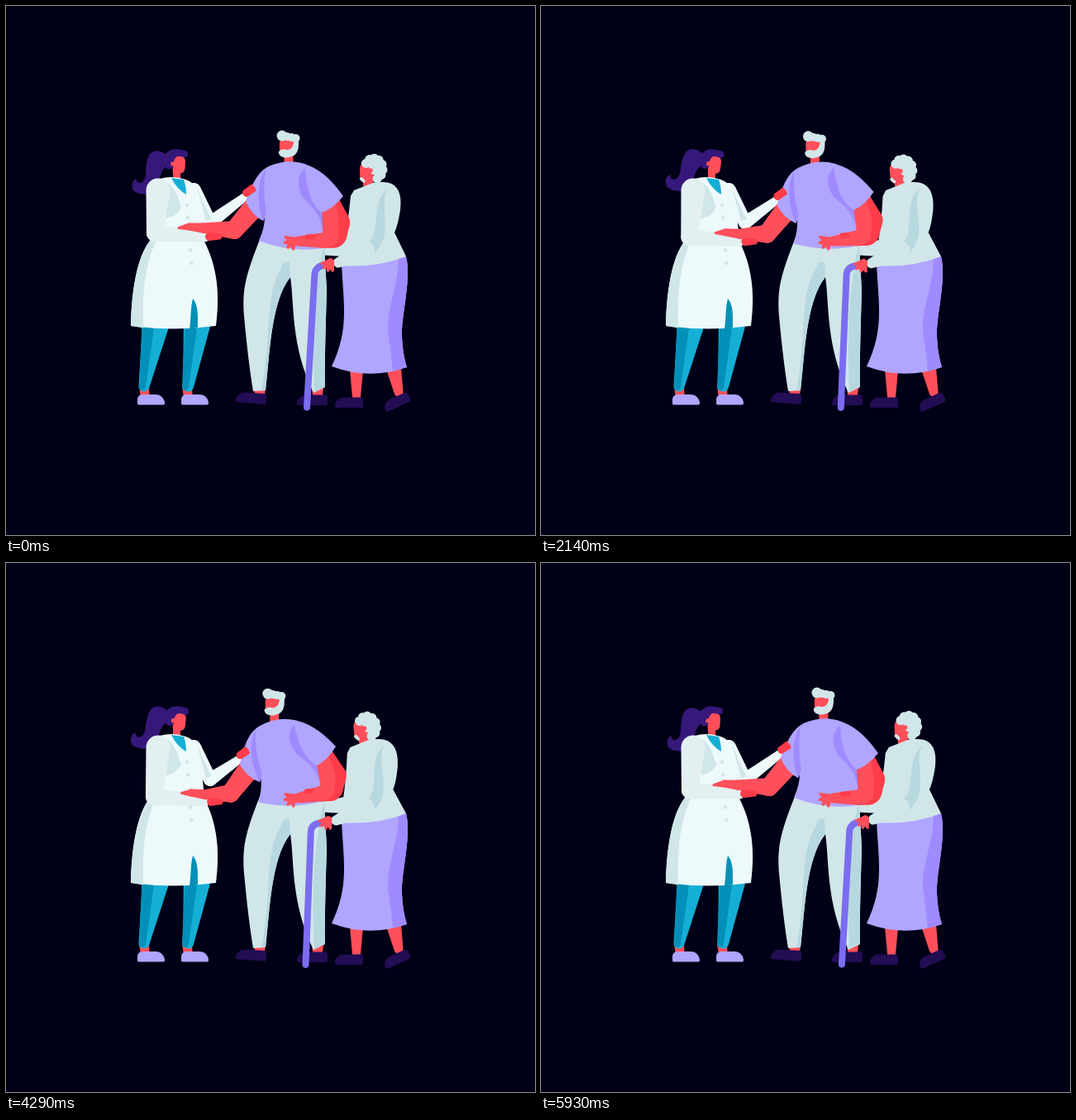
Recreate the animation shown at these times as an HTML page with a canvas. Size 640 by 640 pixels, loop 6 s.

```html
<!DOCTYPE html>
<html lang="en">
<head>
<meta charset="utf-8">
<title>Caregiver with an elderly couple</title>
<style>
html, body { margin: 0; width: 100%; height: 100%; overflow: hidden; background: #000016 }
canvas { display: block; width: 100vw; height: 100vh }
</style>
</head>
<body>
<canvas id="stage"></canvas>
<script>
const PERIOD = 3030, LOOP = 6000, SIZE = 640;
const SKIN = '#ff4f5a', FLUSH = '#ff3d4a', PALE = '#d1e6e9', PALE_SHADE = '#b8d8df';
const COAT = '#edf9fb', SLEEVE = '#e3f0f1', TEAL = '#15afd6', TEAL_SHADE = '#0290b8';
const LILAC = '#b0a5ff', VIOLET = '#9f8aff', HAIR = '#36187a', SHOE = '#230d54', CANE = '#7a6df0';

const canvas = document.getElementById('stage');
const ctx = canvas.getContext('2d');
const ratio = window.devicePixelRatio || 1;
canvas.width = canvas.height = SIZE * ratio;

function shape(color, path) {
  ctx.fillStyle = color;
  ctx.fill(new Path2D(path));
}

function dot(color, x, y, r) {
  ctx.fillStyle = color;
  ctx.beginPath();
  ctx.arc(x, y, r, 0, 7);
  ctx.fill();
}

// Tapered segments through joints [x, y, radius].
function limb(color, ...joints) {
  ctx.fillStyle = color;
  for (let i = 1; i < joints.length; i++) {
    const [x, y, r] = joints[i - 1], [u, v, s] = joints[i];
    const dir = Math.atan2(v - y, u - x);
    const side = Math.acos((r - s) / Math.hypot(u - x, v - y));
    ctx.beginPath();
    ctx.arc(x, y, r, dir + side, dir - side + 2 * Math.PI);
    ctx.arc(u, v, s, dir - side, dir + side);
    ctx.fill();
  }
}

// Four fingers fanned between two angles.
function hand(color, x, y, from, to, length) {
  for (let i = 0; i < 4; i++) {
    const a = from + (to - from) * i / 3;
    limb(color, [x, y, 4.5], [x + length * Math.cos(a), y + length * Math.sin(a), 1.7]);
  }
}

function shoe(color, x, y, width, corners) {
  ctx.fillStyle = color;
  ctx.beginPath();
  ctx.roundRect(x, y, width, 12.5, corners);
  ctx.fill();
}

function placed(setup, paint) {
  ctx.save();
  setup();
  paint();
  ctx.restore();
}

const shifted = (x, y, paint) => placed(() => ctx.translate(x, y), paint);
const turned = (deg, x, y, paint) => placed(() => {
  ctx.translate(x, y);
  ctx.rotate(deg * Math.PI / 180);
  ctx.translate(-x, -y);
}, paint);
// Leans everything above the base line, leaving the base in place.
const leaned = (slope, base, paint) => placed(() => ctx.transform(1, 0, slope, 1, -slope * base, 0), paint);
const swayer = k => (x, y, r, dx, dy) => [x + dx * k, y + dy * k, r];

function drawNurse(nod, sway) {
  for (const x of [0, 52]) {
    limb(SKIN, [167 + x, 460, 6], [168 + x, 470, 5.5]);
    limb(TEAL, [181 + x * .96, 386, 16], [167 + x * 1.03, 460, 6.5]);
    limb(TEAL_SHADE, [172 + x, 386, 7.5], [165 + x, 461, 4]);
    shoe(LILAC, 159 + x * 1.02, 470, 33, [7, 13, 2, 2]);
  }
  turned(8 * nod, 207, 203, () => {
    turned(4.5 * nod, 195, 185, () =>
      shape(HAIR, 'M195 181C187 173 174 172 171 186C167 200 172 207 165 213C161 216 157 213 158 209C153 210 151 217 154 223C160 229 178 230 183 221C188 211 184 201 195 193Z'));
    limb(SKIN, [209, 188, 8], [211, 197, 5.5]);
    limb(SKIN, [206, 197, 4.5], [207, 210, 4.5]);
    shape(HAIR, 'M191 190C189 178 200 171 211 174Q221 174 220 180C218 186 212 181 207 182Q202 185 202 195Q195 202 191 190Z');
    dot(SKIN, 202, 191, 2.8);
  });

  shape(COAT, 'M186 209Q200 205 214 209Q232 212 236 240L240 285C256 316 259 350 254 387Q203 394 151 387C152 345 158 305 174 284L186 260Z');
  shape(PALE, 'M174 284C158 305 152 345 151 387L166 389.5C165 345 168 315 181 285Z');
  shape(TEAL_SHADE, 'M226 354C233 362 232 376 232 389L222 391C224 378 223 366 226 354Z');
  shape(TEAL, 'M200 208L215 210Q218 218 218 228Q207 222 200 208Z');
  limb(COAT, [227, 223, 9], [247, 262, 8], sway(289, 231, 5, -7, 6.5));
  shape(PALE, 'M231 219Q240 242 249 258L242 260ZM190 212Q204 214 212 244Q206 255 194 257Z');
  limb(SLEEVE, [184, 223, 14.5], sway(180, 275, 10, -1, 7), sway(240, 279, 6.5, 0, 8));
  for (const y of [241, 256, 295.5, 311]) dot(PALE, 219 + (y - 241) * .075, y, 2.2);
}

function drawWife(k, sway) {
  limb(SKIN, [424, 440, 8], [424, 473, 5]);
  limb(SKIN, [469, 438, 9], [475, 467, 5.5]);
  shoe(SHOE, 398, 473.5, 34, [10, 4, 2, 2]);
  turned(-24, 472, 479, () => shoe(SHOE, 456, 473, 33, [10, 4, 2, 2]));
  limb(PALE, [385, 295, 6.5], [410, 293, 10]);

  shape(LILAC, 'M406 311L484 303C491 330 478 375 479 400Q480 422 485 437Q440 453 394 436C416 390 408 360 406 311Z');
  shape(VIOLET, 'M475 305C475 340 458 370 463 400Q466 420 468 442L485 437Q480 422 479 400C478 375 491 330 484 303Z');

  leaned(.062 * k, 303, () => {
    limb(SKIN, [439, 205, 6], [438, 216, 6]);
    shape(PALE, 'M421 223L444 214Q448 213 456 213C472 213 480 224 477 247Q474 266 470 274L484 303Q448 317 406 314L408 290Q414 262 417 230Z');
    shape(PALE_SHADE, 'M462 221C444 234 451 260 444 279Q432 296 408 305L430 310Q452 300 458 277C462 252 453 238 462 221Z');
    shifted(-1.7 * k, k, () => {
      limb(SKIN, [437, 197, 9], [434, 208, 5.5]);
      limb(PALE, [430, 209, 2], [433, 212, 1.8]);
      dot(PALE, 448, 196, 9);
      for (let i = 0; i < 8; i++) {
        const a = -2.6 + i * .54;
        dot(PALE, 445 + 11 * Math.cos(a), 197 + 12.8 * Math.sin(a), 5.6);
      }
      dot(SKIN, 441, 199, 2.8);
    });
  });
  limb(PALE, [434, 296, 12], sway(402, 310.5, 6, -3, 1));
}

function drawHusbandHead() {
  limb(SKIN, [342, 180, 5.5], [342, 192, 5.5]);
  limb(SKIN, [341, 166, 10], [340, 174, 9]);
  shape(PALE, 'M348 160L354 162C355 176 351 181 344 182.5C337 185 329 182 330 176Q334 172 339 174Q346 175 348 166Z');
  dot(PALE, 334, 157, 6.4);
  for (let i = 0; i < 3; i++) dot(PALE, 340 + i * 5.3, 158 + i, 5);
}

function drawHusband(k, sway) {
  limb(SKIN, [307, 462, 7], [307, 470, 6]);
  limb(SKIN, [377, 462, 7], [377, 470, 6]);
  turned(4, 296, 475, () => shoe(SHOE, 278, 468, 37, [13, 4, 2, 2]));
  shoe(SHOE, 352, 470.5, 37, [13, 4, 2, 2]);

  shape(PALE, 'M308 280C288 330 286 345 288 375Q293 430 299 466L314 465C319 425 320 358 344 328C349 360 344 410 372 468L386 461Q385 440 388 345L385 286Z');
  shape(PALE_SHADE, 'M343 310Q335 307 333 317C312 350 322 400 309 465.5L314 465C319 425 320 358 344 328ZM382 300C372 350 370 400 373 467L386 461Q385 440 388 345L385 290Z');

  limb(SKIN, sway(303, 240, 13, -8, 8), sway(276, 271, 11, -4, 7), sway(238, 268.5, 6, 3, 10.5),
    sway(222, 267, 4.5, 2, 10), sway(209, 268.5, 1.5, 3, 9));
  limb(FLUSH, sway(246, 279, 5, 2, 9), sway(258, 279, 3.5, 1, 9));

  const forearm = sway(386, 283.5, 9.5, -4, -4);
  limb(FLUSH, sway(393, 240, 12, -8, -6), sway(400, 262, 16, -4, -4), sway(396, 276, 16.5, -4, -4), forearm);
  limb(SKIN, sway(390, 240, 9, -8, -6), sway(393, 262, 10, -4, -4), sway(390, 279, 12, -4, -4));

  shifted(-15.7 * k, k, drawHusbandHead);
  turned(-7.1 * k, 345, 292, () => {
    shape(LILAC, 'M320 193Q343 184 364 192C385 200 398 216 408 230Q396 245 382 250L384 293Q345 299 306 284Q313 268 313 256L311 260Q297 253 290 236C298 215 305 199 320 193Z');
    shape(VIOLET, 'M314 197C302 215 305 245 311 260L315 250Q310 225 314 197ZM362 197C350 205 352 226 364 237Q382 252 384 277L382 250Q364 237 362 197Z');
  });

  limb(SKIN, forearm, sway(354, 284.5, 6, -1, 0));
  hand(SKIN, 347, 284, 3.6, 1.5, 10);
  limb(FLUSH, sway(365, 279.5, 3, -1, -3), sway(372, 279, 3, -2, -3));
  shifted(-7 * k, 6 * k, () => hand(FLUSH, 291, 226, -.95, -.3, 10.5));
}

function drawCane(k) {
  ctx.strokeStyle = CANE;
  ctx.lineWidth = 8;
  ctx.lineCap = 'round';
  ctx.beginPath();
  ctx.moveTo(364 - 1.6 * k, 485.5 + .5 * k);
  ctx.lineTo(373.5 - 5 * k, 324);
  ctx.quadraticCurveTo(375 - 5 * k, 314, 388 - 3 * k, 313 + k);
  ctx.stroke();
  shifted(-3 * k, k, () => hand(SKIN, 392.5, 310, 3, 1.3, 10.5));
}

const wave = (phase, peak) => Math.cos(Math.PI * (phase - peak)) ** 2;

function draw(now) {
  const phase = now % LOOP % PERIOD / PERIOD;
  const man = 1.153 * wave(phase, .485);
  const wife = 1.057 * wave(phase, .53);
  const off = (phase - .57) / .265;
  const nod = Math.abs(off) < 1 ? wave(off / 2, 0) : 0;

  ctx.setTransform(ratio, 0, 0, ratio, 0, 0);
  ctx.clearRect(0, 0, SIZE, SIZE);
  drawNurse(nod, swayer(man));
  drawWife(wife, swayer(wife));
  drawHusband(man, swayer(man));
  drawCane(wife);
  requestAnimationFrame(draw);
}
requestAnimationFrame(draw);
</script>
</body>
</html>
```
